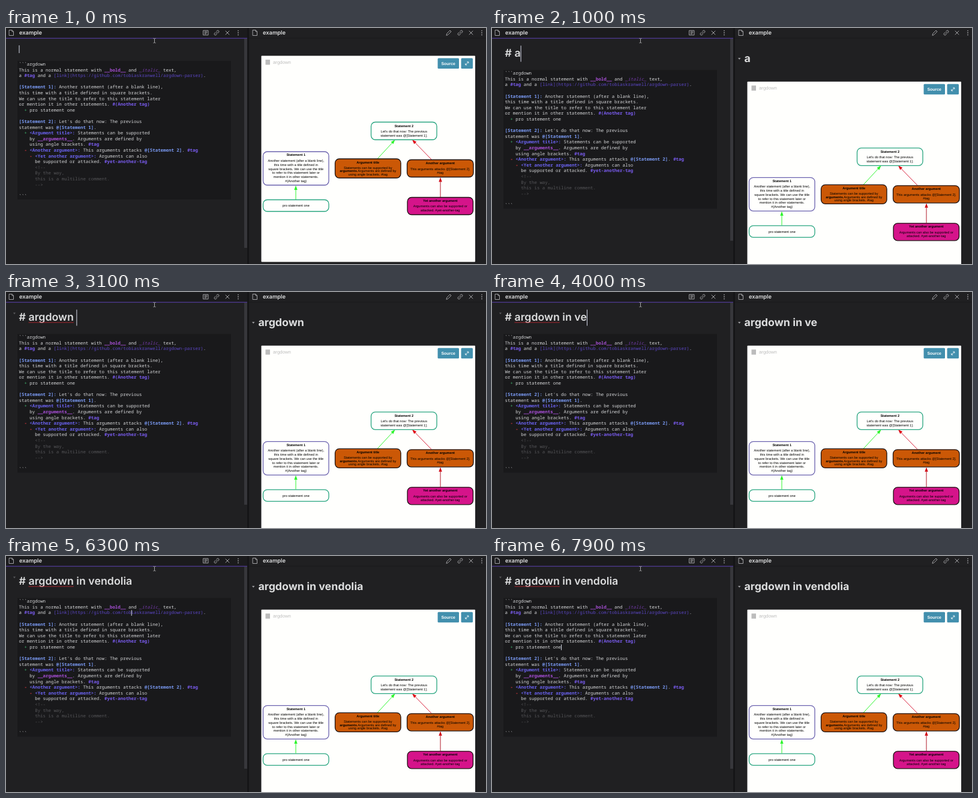
Recreate the animation shown at these times as an HTML page. Size 800 by 395 pixels, loop 8000 ms.

```html
<!DOCTYPE html>
<html lang="en">
<head>
<meta charset="utf-8">
<title>Argdown editor</title>
<style>
html, body { margin: 0; width: 100%; height: 100%; overflow: hidden; background: #202022; }
svg { display: block; width: 800px; height: 395px; }
text { white-space: pre; text-rendering: geometricPrecision; }
.ui { font-family: Inter, sans-serif; fill: #dcddde; }
.head { font-size: 17.8px; }
.code { font: 7.43px "Noto Sans Mono", monospace; fill: #d6d7d9; }
.map { font: 5.6px "Liberation Sans", Arial, sans-serif; text-anchor: middle; }
.b { font-weight: 700; }
.t { fill: #7b9bf5; font-weight: 700; }
.g { fill: #7a5cf0; font-weight: 700; }
.l { fill: #5b46c4; }
.a { fill: #6a62ee; font-weight: 700; }
.m { fill: #a94fd8; font-weight: 700; }
.i { fill: #7139a5; font-style: italic; }
.c { fill: #555558; }
.p { fill: #3fae6a; }
.n { fill: #e0393e; font-weight: 700; }
.icon { fill: none; stroke: #a2a2a5; stroke-width: 1; stroke-linecap: round; stroke-linejoin: round; }
</style>
</head>
<body>
<svg viewBox="0 0 800 395">
  <defs>
    <path id="file" d="M-3.5-4.5h4.5l2.5 2.5v6.5h-7zM1-4.5v2.5h2.5"/>
    <path id="link" d="M-1 1.2L1.3-1.1M-.6-2l1.4-1.4a1.8 1.8 0 0 1 2.6 2.6L2 .6M.6 2L-.8 3.4a1.8 1.8 0 0 1-2.6-2.6L-2-.6"/>
    <path id="close" d="M-3-3l6 6M3-3l-6 6"/>
    <path id="dots" d="M0-3.4v.01M0 0v.01M0 3.4v.01" stroke-width="1.8"/>
    <path id="page" d="M-4-3.8h8v7.6h-8zM-2-1.8h4M-2 0h4M-2 1.8h2.5"/>
    <path id="pen" d="M-4 4l.8-2.8L2-4l2 2-5.200 5.200z"/>
  </defs>

  <rect width="402" height="17" fill="#1b1b1d"/>
  <rect y="16.500" width="402" height="1.500" fill="#483784"/>
  <rect x="405" y="16.500" width="395" height="1" fill="#19191b"/>
  <rect id="thumb" x="397" y="18" width="5" fill="#37373b"/>
  <rect x="402" width="3" height="395" fill="#151517"/>
  <g class="ui" font-size="9.3" font-weight="600">
    <text x="22" y="11">example</text>
    <text x="428" y="11">example</text>
  </g>
  <g id="icons" class="icon"></g>

  <path id="fold" d="M12 34.500h4l-2 3z" fill="#59595c"/>
  <text id="source" class="ui" x="21.500"></text>
  <path id="spell" stroke="#a8252d" fill="none"/>
  <g id="editor">
    <rect x="19" y="55" width="356" height="232" fill="#19191b"/>
    <g id="code" class="code"></g>
  </g>
  <rect id="caret" width="1" fill="#d8dcec"/>
  <path d="M245.500 17.500h1.200l.8.8.8-.8h1.200M247.500 18.300v6M245.500 25h1.200l.8-.8.8.8h1.200" fill="none" stroke="#c9c9cc" stroke-width=".8"/>

  <g id="preview">
    <path d="M410 50h4.500l-2.250 3z" fill="#9a9a9d"/>
    <text id="title" class="ui head b" x="420.500" y="56.500"></text>
  </g>
  <g id="map">
    <rect x="425.500" y="46.500" width="356.500" height="345" rx="1" fill="#fffffd"/>
    <rect x="432.500" y="53" width="7.500" height="8.500" fill="#bcbcbc"/>
    <text class="map" x="460" y="60" style="font-size:7.8px" fill="#bdbdbd">argdown</text>
    <g fill="#428fad">
      <rect x="719.500" y="50.500" width="35.500" height="17.500" rx="1.500"/>
      <rect x="758.500" y="50.500" width="19.500" height="17.500" rx="1.500"/>
    </g>
    <text class="map b" x="737.200" y="61.800" style="font-size:6.9px" fill="#fff">Source</text>
    <path d="M766 61.500l4.500-4.500M768.300 56.700h2.500v2.500M765.700 59.300v2.500h2.500" fill="none" stroke="#fff" stroke-width=".9"/>
    <g id="graph" class="map"></g>
  </g>
</svg>
<script>
const $ = id => document.getElementById(id);
const set = (el, attrs) => { for (const k in attrs) el.setAttribute(k, attrs[k]); };

// {class|text} marks a coloured run
const esc = s => s.replace(/&/g, '&amp;').replace(/</g, '&lt;').replace(/>/g, '&gt;');
const rich = s => esc(s).replace(/\{(\w)\|(.*?)\}/g, '<tspan class="$1">$2</tspan>');
const textAt = (x, y, s, extra = '') => `<text x="${x}" y="${y}" ${extra}>${rich(s)}</text>`;

const lines = `\`\`\`argdown
This is a normal statement with {m|__bold__} and {i|_italic_} text,
a {g|#tag} and a {l|[link](https://github.com/tobiaskranwell/argdown-parser)}.

{t|[Statement 1]:} Another statement (after a blank line),
this time with a title defined in square brackets.
We can use the title to refer to this statement later
or mention it in other statements. {g|#(Another tag)}
  {p|+} pro statement one

{t|[Statement 2]:} Let's do that now: The previous
statement was {t|@[Statement 1]}.
  {p|+} {a|<Argument title>:} Statements can be supported
    by {m|__arguments__}. Arguments are defined by
    using angle brackets. {g|#tag}
  {n|-} {a|<Another argument>:} This arguments attacks {t|@[Statement 2]}. {g|#tag}
    {n|-} {a|<Yet another argument>:} Arguments can also
      be supported or attacked. {g|#yet-another-tag}
      {c|<!--}
      {c|By the way,}
      {c|this is a multiline comment.}
      {c|-->}

\`\`\``.split('\n');
const LEFT = 21.5, CHAR = 4.457, PITCH = 9.6;
$('code').innerHTML = lines.map((s, i) => textAt(LEFT, 63 + i * PITCH, s)).join('');

$('icons').innerHTML = [
  ['file', 9], ['page', 333], ['link', 351], ['close', 369], ['dots', 387],
  ['file', 415], ['pen', 738], ['link', 757], ['close', 775], ['dots', 793]
].map(([id, x]) => `<use href="#${id}" x="${x}" y="8"/>`).join('');

function node(x, y, w, h, fill, stroke, title, titleY, body, bodyY, pitch) {
  const cx = x + w / 2;
  return `<rect x="${x}" y="${y}" width="${w}" height="${h}" rx="7" fill="${fill}" stroke="${stroke}" stroke-width="1.3"/>` +
    textAt(cx, titleY, title, 'class="b"') +
    body.map((s, i) => textAt(cx, bodyY + i * pitch, s)).join('');
}

function edge(x1, y1, x2, y2, color, tip = color) {
  const d = Math.hypot(x2 - x1, y2 - y1), ux = (x2 - x1) / d, uy = (y2 - y1) / d;
  const bx = x2 - ux * 7.5, by = y2 - uy * 7.5;
  return `<path d="M${x1} ${y1}L${bx} ${by}" stroke="${color}"/>` +
    `<path d="M${x2} ${y2}L${bx - uy * 2.7} ${by + ux * 2.7}L${bx + uy * 2.7} ${by - ux * 2.7}z" fill="${tip}"/>`;
}

const TEAL = '#27a57f', ORANGE = '#cb5806', PINK = '#d5148a', INK = '#1c1210', GREEN = '#2cf52c';
$('graph').innerHTML =
  edge(483, 287, 483, 263.5, GREEN) +
  edge(619, 219, 648.5, 187, GREEN) +
  edge(709, 220, 677, 187, '#d8203a', '#e00010') +
  edge(724, 283, 724, 250, '#b01828', '#d00010') +
  node(608.5, 157.5, 109.5, 29.5, '#fffffd', TEAL, 'Statement 2', 165.5,
    ["Let's do that now: The previous", 'statement was @[Statement 1].'], 175, 6.7) +
  node(428.5, 207, 109.5, 56, '#fffffd', '#6a61ae', 'Statement 1', 214.3,
    ['Another statement (after a blank line),', 'this time with a title defined in',
     'square brackets. We can use the title', 'to refer to this statement later or',
     'mention it in other statements.', '#(Another tag)'], 224, 6.8) +
  node(428.5, 287.5, 109.5, 19.5, '#fffffd', TEAL, '', 0, ['pro statement one'], 299.3, 0) +
  node(548.5, 219, 109.5, 32, ORANGE, INK, 'Argument title', 226.8,
    ['Statements can be supported by', '{b|arguments}.Arguments are defined by',
     'using angle brackets. #tag'], 235.5, 5.8) +
  node(668.5, 220.5, 110.5, 29, ORANGE, INK, 'Another argument', 228,
    ['This arguments attacks @[Statement 2].', '#tag'], 238, 6.2) +
  node(669, 283.5, 109.5, 29, PINK, INK, 'Yet another argument', 291,
    ['Arguments can also be supported or', 'attacked. #yet-another-tag'], 300.3, 6.7);

const TEXT = '# argdown in vendolia';
const keys = [300, 500, 800, 1300, 1700, 2100, 2500, 2700, 2900, 3000, 3300, 3400, 3550];
while (keys.length < TEXT.length) keys.push(3800 + (keys.length - 13) * 140);
const downs = [5500, 5700, 5950, 6200, 6500, 6750, 7000, 7200, 7450, 7700];
const passed = (times, t) => times.filter(x => x <= t).length;
const plainLength = s => s.replace(/\{\w\|(.*?)\}/g, '$1').length;
const show = (el, on) => { el.style.display = on ? '' : 'none'; };

function draw(t) {
  const typed = passed(keys, t), moved = passed(downs, t);
  const heading = typed > 1, titled = typed > 2, shift = heading ? 15.3 : 0;
  const src = $('source');
  src.textContent = TEXT.slice(0, typed);
  set(src, { y: heading ? 48 : 38.5, 'font-size': heading ? 17.8 : 9.3, 'font-weight': heading ? 600 : 400 });
  const width = n => n ? src.getSubStringLength(0, n) : 0;

  set($('editor'), { transform: `translate(0 ${shift})` });
  set($('thumb'), { height: heading ? 338 : 350 });
  show($('preview'), titled);
  $('title').textContent = TEXT.slice(2, typed);
  set($('map'), { transform: `translate(0 ${titled ? 43.3 : 0})` });

  const checked = t >= 2000;
  show($('fold'), checked);
  show($('spell'), checked);
  if (checked) set($('spell'), { d: `M${LEFT + width(2)} 51H${LEFT + width(Math.min(typed, 9))}` });

  let x = LEFT + width(typed), y = heading ? 29.5 : 29, height = heading ? 27 : 13;
  if (moved === 1) { x = LEFT; y = 56; height = 13; }
  if (moved > 1) {
    const row = moved - 2;
    x = LEFT + CHAR * Math.min(42, plainLength(lines[row]));
    y = 56 + shift + row * PITCH;
    height = 9.5;
  }
  set($('caret'), { x, y, height });
}

function tick() {
  draw(performance.now() % 8000);
  requestAnimationFrame(tick);
}
tick();
</script>
</body>
</html>
```
